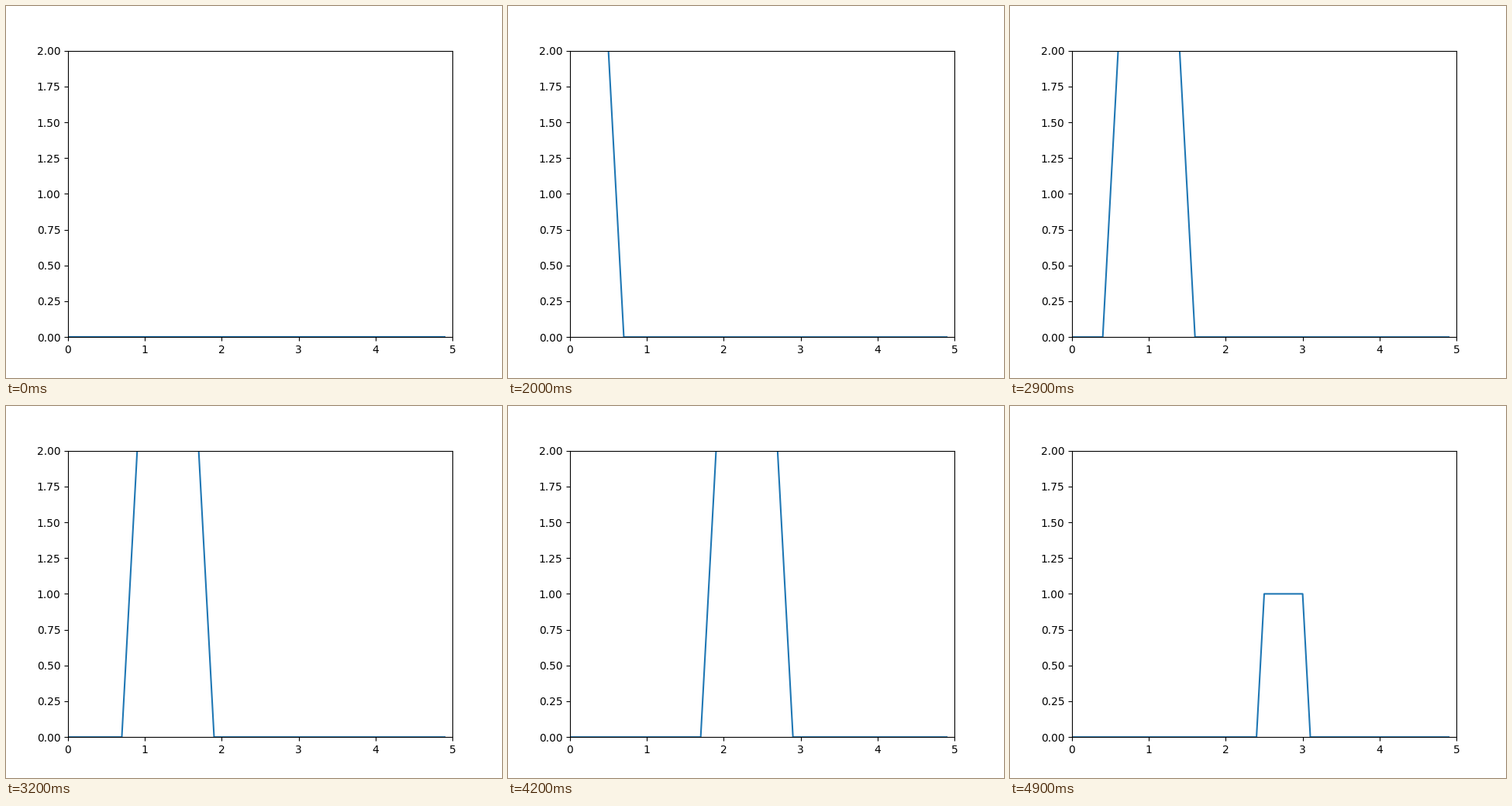
A matplotlib script for the animation above (5 s loop, 640 by 480 pixels).

```python
import numpy as np
import matplotlib.pyplot as plt
from matplotlib.animation import FuncAnimation

STEPS = 50
WIDTH = 6

x = np.arange(STEPS) * 0.1


def box(start):
    """Unit pulse of WIDTH samples, cut off at the end of the array."""
    y = np.zeros(STEPS)
    y[start:start + WIDTH] = 1
    return y


kernel = box(0)

fig, ax = plt.subplots(figsize=(6.4, 4.8), dpi=100)
ax.set_xlim(0, 5)
ax.set_ylim(0, 2)
line, = ax.plot(x, np.zeros(STEPS))


def update(step):
    line.set_ydata(np.convolve(box(step), kernel, mode="same"))
    return line,


anim = FuncAnimation(fig, update, frames=STEPS, interval=100,
                     repeat=True, repeat_delay=0, blit=False)
plt.show()
```
